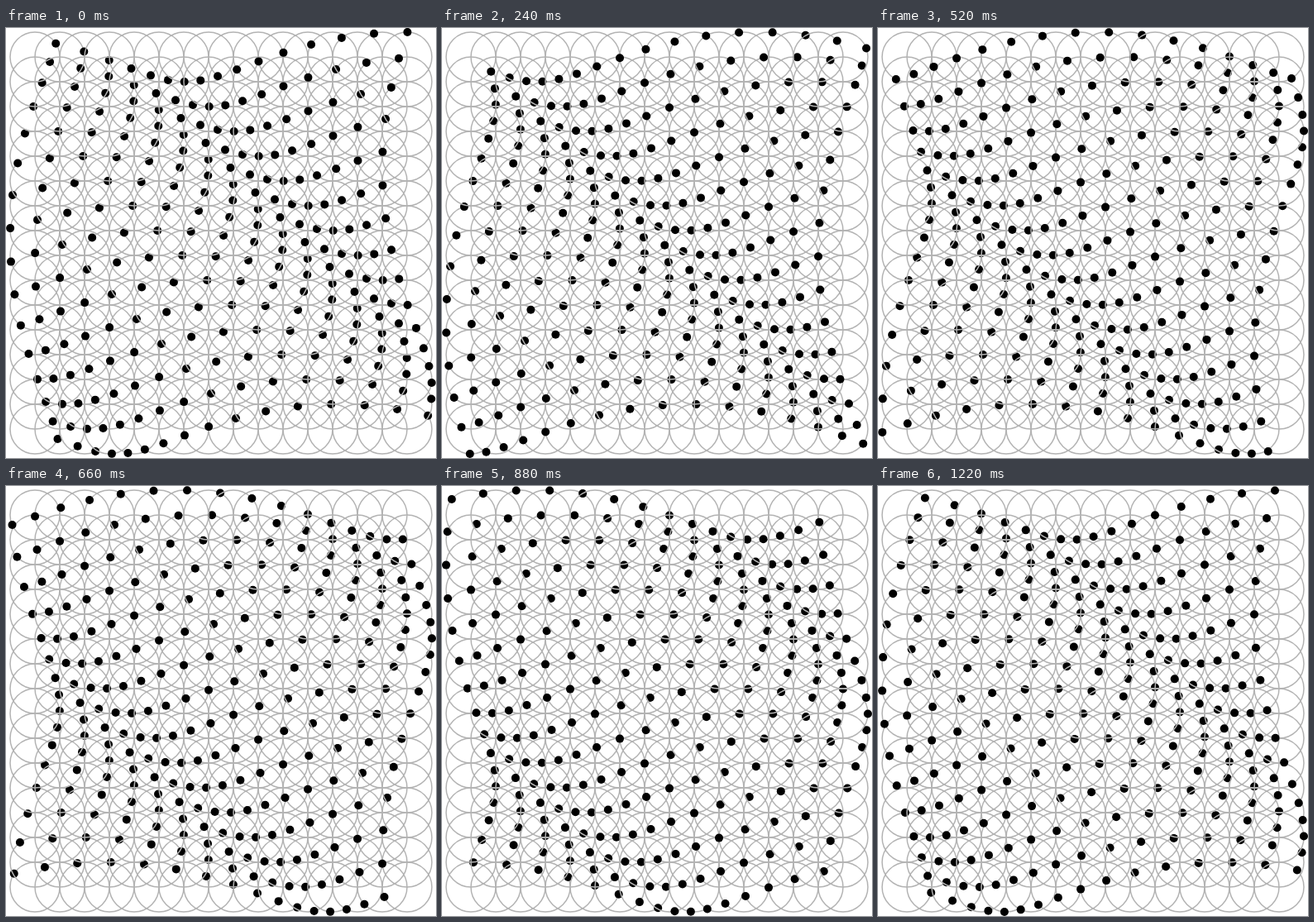
Animation of 520 by 520 pixels, one loop 1240 ms. Source, as an HTML page with a canvas:

```html
<!DOCTYPE html>
<html lang="en">
<head>
<meta charset="utf-8">
<title>Circling dots</title>
<style>
  html, body { margin: 0; width: 100%; height: 100%; overflow: hidden; background: #fff; }
  canvas { display: block; width: 520px; height: 520px; }
</style>
</head>
<body>
<canvas id="stage" width="520" height="520"></canvas>
<script>
const ctx = document.getElementById('stage').getContext('2d');
const SIZE = 520, COUNT = 16, SPACING = 30, MARGIN = 35;
const ORBIT = 30, DOT = 5;
const LOOP_MS = 1240, STEP_MS = 20;
const TURN_PER_STEP = 0.1;
const START_ANGLE = -0.572, PHASE = 0.3533;

function circlePath(x, y, radius) {
  ctx.beginPath();
  ctx.arc(x, y, radius, 0, Math.PI * 2);
}

function drawCell(col, row, turn) {
  const x = MARGIN + col * SPACING;
  const y = MARGIN + row * SPACING;
  const angle = START_ANGLE + PHASE * (col - row) + turn;
  circlePath(x, y, ORBIT);
  ctx.stroke();
  circlePath(x + ORBIT * Math.cos(angle), y + ORBIT * Math.sin(angle), DOT);
  ctx.fill();
}

function draw(ms) {
  const turn = Math.floor((ms % LOOP_MS) / STEP_MS) * TURN_PER_STEP;
  ctx.fillStyle = '#fff';
  ctx.fillRect(0, 0, SIZE, SIZE);
  ctx.fillStyle = '#000';
  ctx.strokeStyle = '#b3b3b3';
  ctx.lineWidth = 1.5;
  // Columns left to right, each from the bottom up: later rings cross earlier dots.
  for (let col = 0; col < COUNT; col++) {
    for (let row = COUNT - 1; row >= 0; row--) drawCell(col, row, turn);
  }
}

let start;
function tick(now) {
  start ??= now;
  draw(Math.max(0, now - start));
  requestAnimationFrame(tick);
}
draw(0);
requestAnimationFrame(tick);
</script>
</body>
</html>
```
